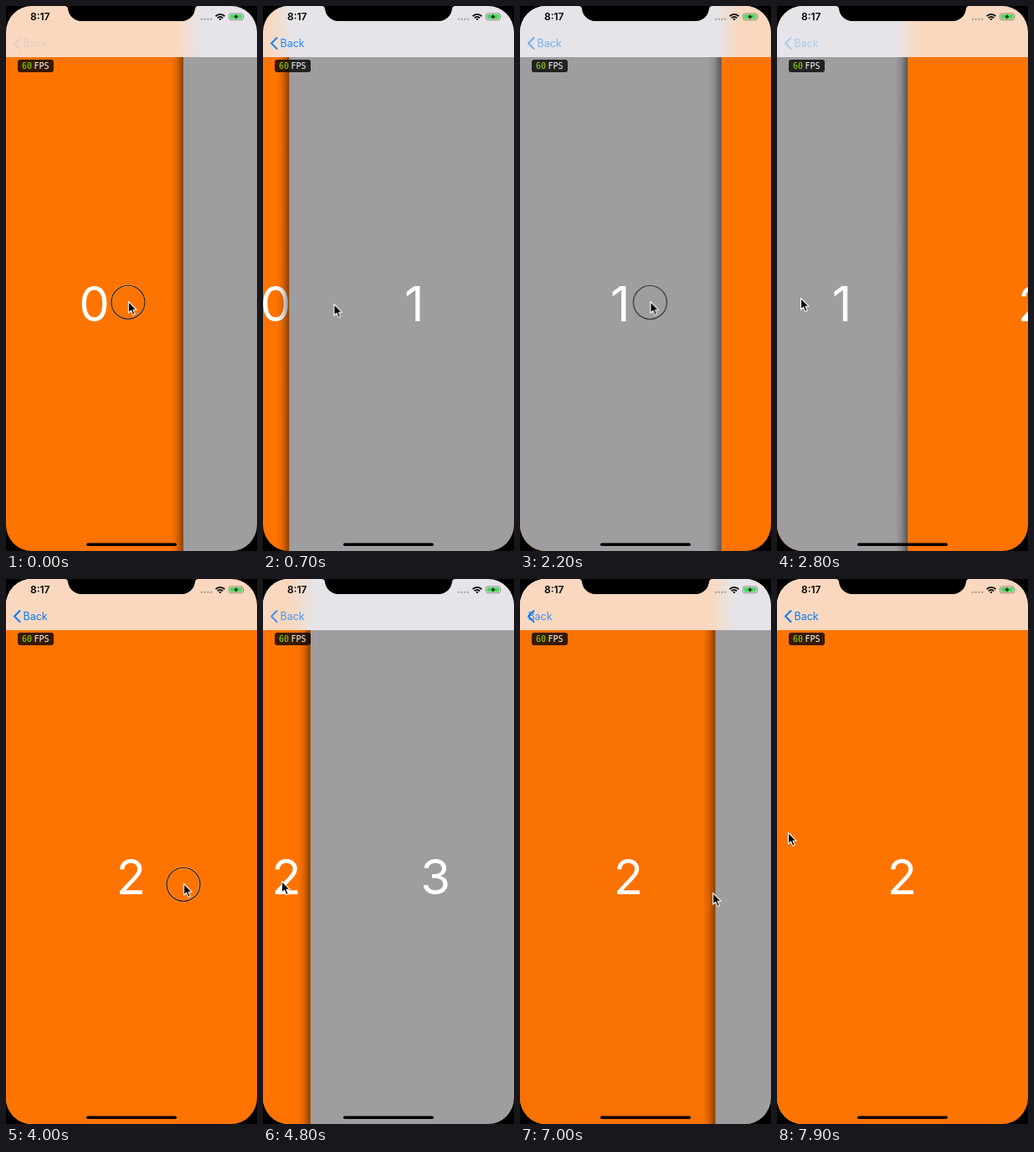
These frames come from a looping animation (300 px wide and 650 px high, 8000 ms). An HTML page:

```html
<!DOCTYPE html>
<html lang="en">
<head>
<meta charset="utf-8">
<title>Swipe navigation</title>
<style>
/* progress of each pushed page, and whether the stack is popping */
@property --one { syntax: "<number>"; inherits: true; initial-value: 0; }
@property --two { syntax: "<number>"; inherits: true; initial-value: 0; }
@property --three { syntax: "<number>"; inherits: true; initial-value: 0; }
@property --pop { syntax: "<number>"; inherits: true; initial-value: 0; }

html, body { margin: 0; width: 100%; height: 100%; overflow: hidden; background: #000; }

#stage {
  position: relative; width: 300px; height: 650px; overflow: hidden;
  font-family: Inter, "Liberation Sans", sans-serif;
  animation: one 8s linear infinite, two 8s linear infinite,
    three 8s linear infinite, pop 8s linear infinite;
}
#screen { position: absolute; inset: 0; overflow: hidden; border-radius: 31px; }

.page {
  --shift: calc(.5 - .2 * var(--pop));
  position: absolute; width: 300px; height: 650px;
  transform: translateX(calc(300px * (1 - var(--p) - var(--shift) * var(--next))));
}
.orange { --fill: #ff7400; --bar: #f9d8bf; }
.gray { --fill: #9f9d9f; --bar: #e6e4e8; }
.body { position: absolute; inset: 61px 0 0; background: var(--fill); }
.body::before {
  content: ""; position: absolute; top: 0; bottom: 0; left: -15px; width: 15px;
  background: linear-gradient(90deg, transparent, rgba(0,0,0,.12) 45%, rgba(0,0,0,.45));
  opacity: calc(var(--p) * 20);
}
.header {
  position: absolute; top: 0; height: 61px; width: 340px;
  left: calc(-28px * var(--p));
  background: linear-gradient(90deg, transparent, var(--bar) 28px);
}
.digit {
  position: absolute; left: -.5px; width: 300px; top: 258px; line-height: 72px;
  text-align: center; font-size: 58px; color: #fff;
}
.dim { position: absolute; inset: 0; background: #000; opacity: calc(.1 * var(--pop) * var(--next)); }

.back {
  color: #007aff; font-size: 12.5px;
  opacity: min(
    1.1 * var(--one) * var(--one),
    max(1.1 * var(--two) * var(--two), 1 - 2.5 * var(--two)),
    max(1.1 * var(--three) * var(--three), 1 - 2.5 * var(--three), var(--pop)));
}
.back span { position: absolute; left: 20.5px; top: 36px; line-height: 17px; }
.leaving {
  opacity: calc(1 - 2.5 * var(--pop) * (1 - var(--three)));
  transform: translateX(calc(110px * var(--pop) * (1 - var(--three))));
}
.arriving {
  opacity: calc(var(--pop) * (1 - var(--three)));
  transform: translateX(calc(-50px * var(--three)));
}
svg { position: absolute; left: 0; top: 0; overflow: visible; }

.fps {
  position: absolute; left: 13.5px; top: 64px; width: 43.5px; height: 14.5px;
  border-radius: 3px; background: rgba(0,0,0,.78); color: #fff;
  font: 10px/15px "DejaVu Sans Mono", monospace;
}
.fps b, .fps i { position: absolute; font-weight: 400; font-style: normal; }
.fps b { left: 5.5px; color: #94e000; }
.fps i { left: 20px; }
.time { position: absolute; left: 29px; top: 5px; font: 600 12px/16px Inter, "Liberation Sans", sans-serif; color: #000; }

#cursor { animation: move 8s linear infinite; }
#touch { animation: press 8s step-end infinite; }

@keyframes one {
  0% { --one: .293; }
  5.6% { --one: .48; }
  7% { --one: .68; }
  8.5% { --one: .88; }
  10% { --one: .97; }
  11.5%, 100% { --one: 1; }
}
@keyframes two {
  0%, 23.2% { --two: 0; }
  28% { --two: .22; }
  33.5% { --two: .455; }
  35% { --two: .477; }
  36.3% { --two: .7; }
  38% { --two: .9; }
  39.5% { --two: .98; }
  41%, 100% { --two: 1; }
}
@keyframes three {
  0%, 50.5% { --three: 0; }
  56.25% { --three: .37; }
  57.5% { --three: .42; }
  59% { --three: .68; }
  60.7% { --three: .9; }
  62.3% { --three: .98; }
  63.8%, 75% { --three: 1; }
  81% { --three: .64; }
  86.2% { --three: .27; }
  87.5% { --three: .223; }
  88.8% { --three: .08; }
  90% { --three: .02; }
  91%, 100% { --three: 0; }
}
@keyframes pop {
  0%, 69.99% { --pop: 0; }
  70%, 100% { --pop: 1; }
}
@keyframes move {
  0% { transform: translate(146px, 352px); }
  5.6% { transform: translate(65px, 354px); }
  8% { transform: translate(60px, 355px); }
  13% { transform: translate(220px, 356px); }
  15.5%, 22% { transform: translate(274px, 355px); }
  28% { transform: translate(145px, 352px); }
  33.5%, 40% { transform: translate(28px, 348px); }
  43% { transform: translate(60px, 354px); }
  47.5%, 50% { transform: translate(212.5px, 363px); }
  56.25%, 60% { transform: translate(22px, 360px); }
  68%, 74% { transform: translate(10px, 363px); }
  81% { transform: translate(118px, 369px); }
  87.5% { transform: translate(230px, 374px); }
  90%, 91.25% { transform: translate(262px, 371px); }
  95% { transform: translate(140px, 338px); }
  98.75%, 100% { transform: translate(13px, 302px); }
}
@keyframes press {
  0% { opacity: 1; }
  6.25% { opacity: 0; }
  20% { opacity: 1; }
  34.9% { opacity: 0; }
  48.75% { opacity: 1; }
  57.5% { opacity: 0; }
  72.5% { opacity: 1; }
  86.25%, 100% { opacity: 0; }
}
</style>
</head>
<body>
<div id="stage">
  <div id="screen">
    <div class="page orange" style="--p:1; --next:var(--one)">
      <div class="body"><div class="digit">0</div></div><div class="header"></div>
    </div>
    <div class="page gray" style="--p:var(--one); --next:var(--two)">
      <div class="body"><div class="digit">1</div></div><div class="header"></div>
    </div>
    <div class="page orange" style="--p:var(--two); --next:var(--three)">
      <div class="body"><div class="digit">2</div><div class="dim"></div></div><div class="header"></div>
    </div>
    <div class="page gray" style="--p:var(--three); --next:0">
      <div class="body"><div class="digit">3</div></div><div class="header"></div>
    </div>

    <div class="back">
      <svg width="300" height="60"><path d="M16.5 38 10 44.5 16.5 51" fill="none" stroke="#007aff" stroke-width="2.1" stroke-linecap="round" stroke-linejoin="round"/></svg>
      <span class="leaving">Back</span>
      <span class="arriving">Back</span>
    </div>
    <div class="fps"><b>60</b><i>FPS</i></div>
    <div class="time">8:17</div>

    <svg width="300" height="650">
      <path d="M70 0A4 4 0 0 1 74 4V2A16 16 0 0 0 90 18H210A16 16 0 0 0 226 2V4A4 4 0 0 1 230 0Z"/>
      <path d="M234 15.8h12" stroke="#000" stroke-opacity=".28" stroke-width="2.4" stroke-linecap="round" stroke-dasharray="0 3.7"/>
      <g fill="none" stroke="#000" stroke-width="1.8">
        <path d="M250.6 12.1a7.6 7.6 0 0 1 10.8 0M252.8 14.3a4.5 4.5 0 0 1 6.4 0"/>
        <path d="M254.4 15.5a2.3 2.3 0 0 1 3.2 0L256 17.2Z" fill="#000" stroke="none"/>
      </g>
      <rect x="266.5" y="8.8" width="17" height="8" rx="2.3" fill="none" stroke="#000" stroke-opacity=".4" stroke-width=".9"/>
      <rect x="267.8" y="10.1" width="14.4" height="5.4" rx="1.2" fill="#4cd964"/>
      <path d="M284.6 11.3q1.3 1.5 0 3Z" fill-opacity=".4"/>
      <path d="M275.8 9.6 272.2 13.3H274.7L274 16 277.8 12.2H275.2Z"/>
      <rect x="96" y="640.5" width="108" height="3.6" rx="1.8"/>
    </svg>
  </div>

  <svg width="300" height="650">
    <g id="cursor">
      <g id="touch" fill="none">
        <circle cy="1.2" r="20" stroke="#fff" stroke-opacity=".35" stroke-width="2.4"/>
        <circle cy="1.2" r="20" stroke="#000" stroke-width="1.1"/>
      </g>
      <path d="M.5.5V14L3.6 11.2 5.8 16.4 8.2 15.4 6 10.3H10.2Z" stroke="#fff" stroke-width="1.1" stroke-linejoin="round"/>
    </g>
  </svg>
</div>
</body>
</html>
```
